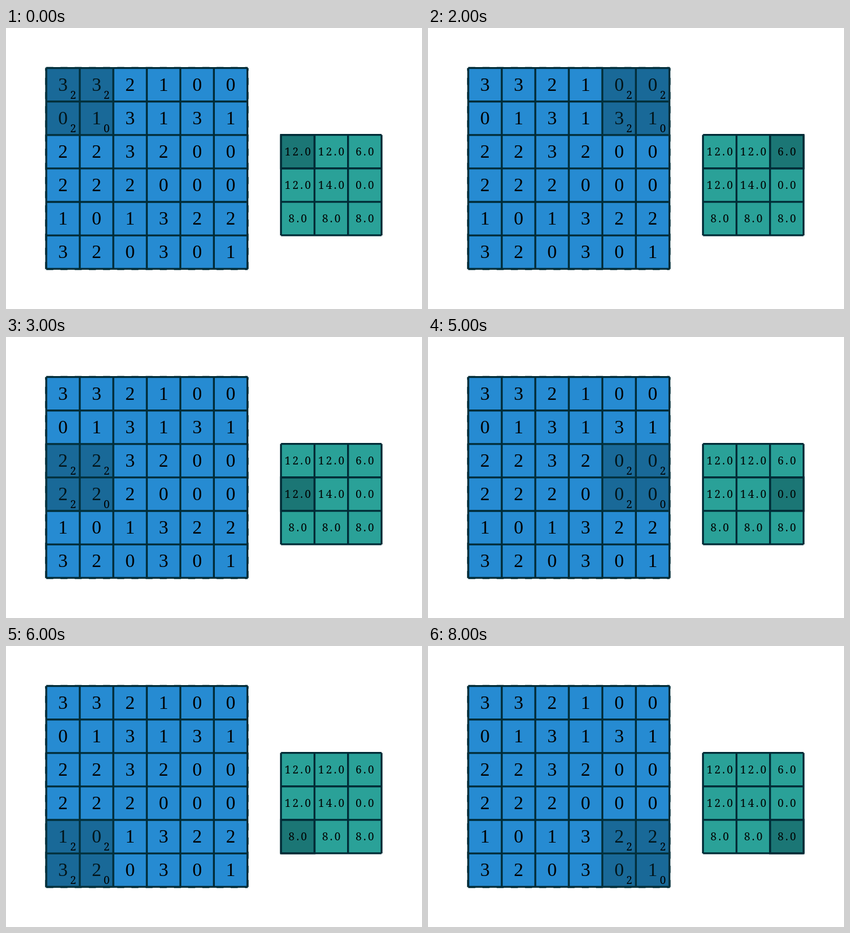
An HTML page that plays this animation: 733x496 px, repeating every 9 s.

```html
<!DOCTYPE html>
<html lang="en">
<head>
<meta charset="utf-8">
<title>Strided convolution</title>
<style>
  html, body { margin: 0; width: 100%; height: 100%; overflow: hidden; background: #fff; }
  svg { display: block; }
  text { text-anchor: middle; fill: #000; }
  .value { font: 33.5px "Liberation Serif", serif; }
  .small { font: 19px "Noto Serif", serif; letter-spacing: 3.2px; }
</style>
</head>
<body>
<svg id="stage" width="733" height="496" viewBox="0 0 733 496"></svg>
<script>
const CELL = 59.08, LINE = 3.33, STEP = 1000, STRIDE = 2;
const INK = '#002b36', SHADE = '#073642';
const stage = document.getElementById('stage');

const input = ['332100', '013131', '223200', '222000', '101322', '320301'];
const kernel = ['22', '20'];
const output = input.filter((_, r) => r % STRIDE === 0).map((_, r) =>
  [0, 1, 2].map(c => convolve(r * STRIDE, c * STRIDE).toFixed(1)));

function convolve(row, col) {
  let sum = 0;
  kernel.forEach((line, r) => [...line].forEach((k, c) => {
    sum += k * input[row + r][col + c];
  }));
  return sum;
}

function add(parent, tag, attrs, content = '') {
  const node = document.createElementNS('http://www.w3.org/2000/svg', tag);
  for (const key in attrs) node.setAttribute(key, attrs[key]);
  node.textContent = content;
  return parent.appendChild(node);
}

function group(x, y) {
  return add(stage, 'g', { transform: `translate(${x} ${y})` });
}

function square(parent, cells, attrs) {
  const size = cells * CELL;
  return add(parent, 'rect', { width: size, height: size, 'stroke-width': LINE, ...attrs });
}

function drawGrid(parent, cells) {
  const size = cells * CELL;
  let d = '';
  for (let i = 0; i <= cells; i++) {
    const p = i * CELL;
    d += `M0 ${p}H${size}M${p} 0V${size}`;
  }
  add(parent, 'path', { d, stroke: INK, 'stroke-width': LINE, fill: 'none' });
}

function drawText(parent, rows, className, dx, dy) {
  rows.forEach((row, r) => [...row].forEach((label, c) =>
    add(parent, 'text', { class: className, x: c * CELL + dx, y: r * CELL + dy }, label)));
}

// Input grid with its sliding kernel window
const inputGrid = group(70.9, 70.7);
square(inputGrid, 6, { fill: '#268bd2' });
const edge = 6 * CELL + 0.4;
add(inputGrid, 'path', {
  d: `M0 ${edge}H${edge}M0 -.4H${edge}M-.4 ${edge}V0M${edge} ${edge}V0`,
  stroke: INK, 'stroke-width': LINE, 'stroke-dasharray': 12.5, fill: 'none'
});
drawGrid(inputGrid, 6);
drawText(inputGrid, input, 'value', CELL / 2, 40.4);
const kernelWindow = add(inputGrid, 'g', {});
square(kernelWindow, 2, {
  fill: SHADE, stroke: SHADE, 'fill-opacity': 0.4, 'stroke-opacity': 0.4
});
drawText(kernelWindow, kernel, 'small', 49, 54.3);

// Output grid with the active cell
const outputGrid = group(484.5, 188.7);
square(outputGrid, 3, { fill: '#2aa198' });
drawGrid(outputGrid, 3);
const activeCell = square(outputGrid, 1, { fill: SHADE, 'fill-opacity': 0.4, stroke: INK });
drawText(outputGrid, output, 'small', CELL / 2 + 1.6, 36.3);

function render(time) {
  const index = Math.floor(time / STEP) % 9;
  const x = index % 3 * CELL, y = Math.floor(index / 3) * CELL;
  kernelWindow.setAttribute('transform', `translate(${x * STRIDE} ${y * STRIDE})`);
  activeCell.setAttribute('transform', `translate(${x} ${y})`);
}

const start = performance.now();
function tick() {
  render(performance.now() - start);
  requestAnimationFrame(tick);
}
tick();
</script>
</body>
</html>
```
